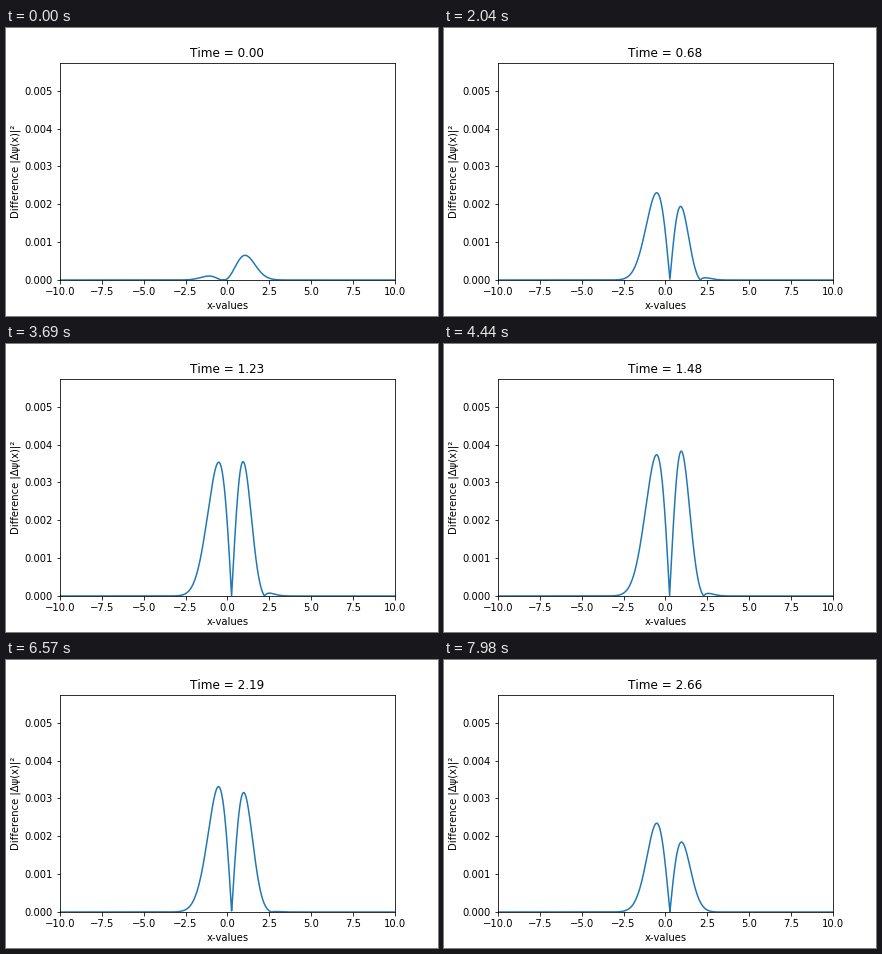
Write a matplotlib script that moves like this. It is 432 px wide and 288 px high and loops after 8000 ms.

```python
import numpy as np
import matplotlib.pyplot as plt
from matplotlib.animation import FuncAnimation

FRAMES = 267
LOOP_MS = 8000
DT = 0.01
CENTER = 0.24

x = np.linspace(-10, 10, 1000)


def difference(t):
    """Gaussian times a quartic whose terms oscillate with time."""
    width = 1.03 + 0.03 * np.cos(2 * t - 4.4)
    u = (x - CENTER) / width

    # The even terms add up to `mean` at the lobe peaks, u = +-1/sqrt(2)
    mean = 0.23 + 0.315 * np.cos(2 * t)
    c0 = 0.12 + 0.05 * np.cos(2 * t)
    c1 = -8.85 * np.sin(t) + 0.73 * np.cos(t) + 0.15 * np.sin(4 * t)
    c4 = 1.4 * np.cos(t - 1.4)**2
    c2 = 2 * (mean - c0) - c4 / 2

    poly = c0 + c1 * u + c2 * u**2 + c4 * u**4
    return 1e-3 * np.abs(poly) * np.exp(-u**2)


plt.rcParams["text.kerning_factor"] = 6
fig, ax = plt.subplots(figsize=(6, 4), dpi=72)
fig.subplots_adjust(left=0.125, right=0.9, bottom=0.125, top=0.88)
ax.set_xlim(-10, 10)
ax.set_ylim(0, 0.005745)
ax.set_xlabel("x-values")
ax.set_ylabel("Difference |Δψ(x)|²")
title = ax.set_title("Time = 0.00")
line, = ax.plot(x, difference(0.0))


def update(i):
    t = i * DT
    line.set_ydata(difference(t))
    title.set_text(f"Time = {t:.2f}")
    return line, title


anim = FuncAnimation(fig, update, frames=FRAMES, interval=LOOP_MS / FRAMES,
                     repeat=True, repeat_delay=0, blit=False)
plt.show()
```
